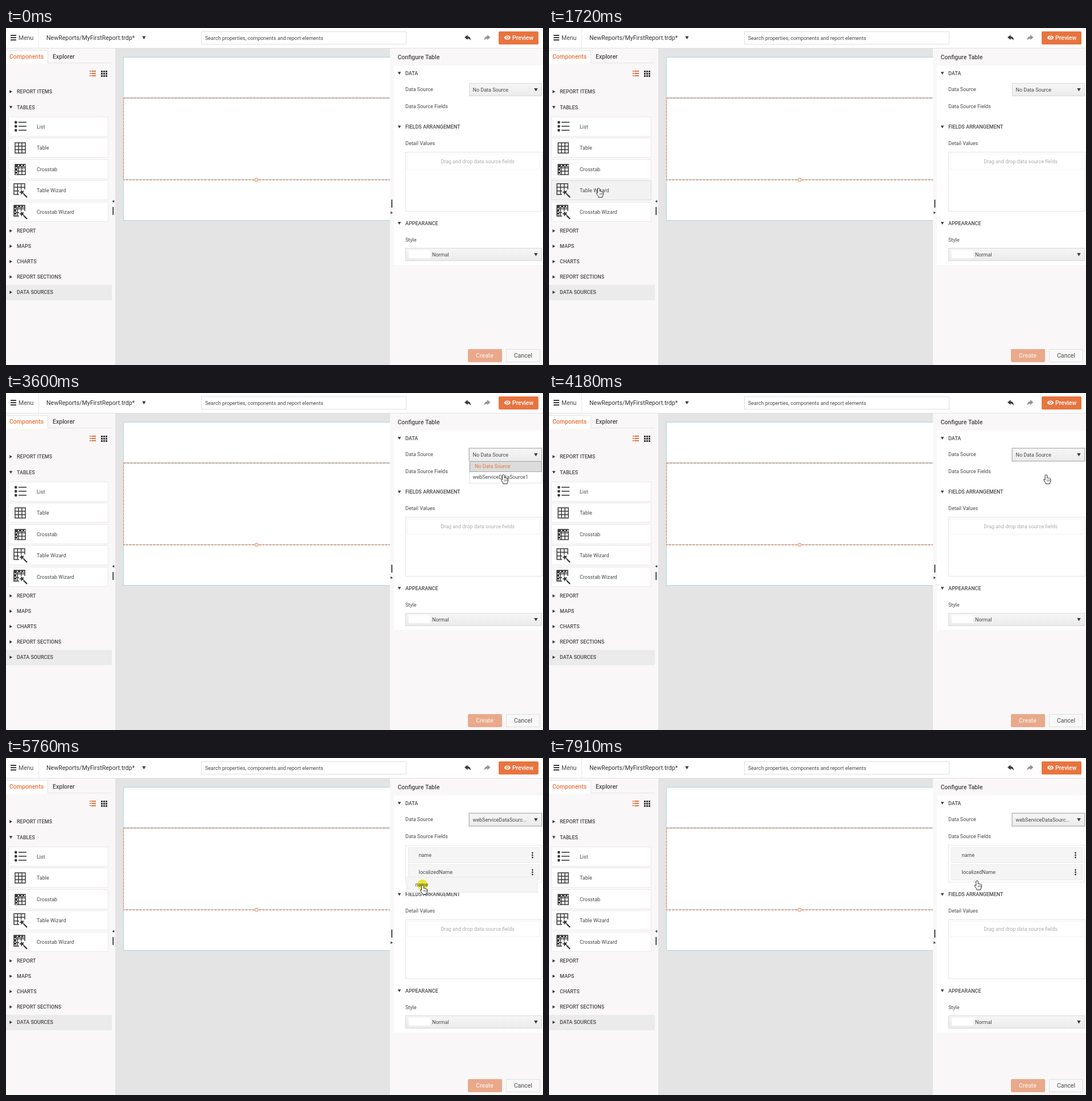
An HTML page with a canvas for the animation above (8 s loop, 944 px wide and 593 px high).

```html
<!DOCTYPE html>
<html lang="en">
<head>
<meta charset="utf-8">
<title>Report designer</title>
<style>
  html, body { margin: 0; width: 100%; height: 100%; overflow: hidden; }
  canvas { display: block; }
</style>
</head>
<body>
<canvas width="944" height="593"></canvas>
<script>
const c = document.querySelector('canvas').getContext('2d');
const LOOP = 8000, STEP = 72, FIRST = 132;
const ORANGE = '#e8743f', DARK = '#3a3a3a', TEXT = '#484848', BLUE = '#a9d8e2';

// Pointer path: [step, x, y]
const PATH = [
  [0, 760, 535], [3, 520, 272], [5, 457, 203], [12, 457, 203],
  [15, 340, 215], [18, 140, 268], [20, 87, 281], [24, 87, 281],
  [27, 205, 262], [31, 503, 204], [35, 748, 92], [36, 876, 104],
  [44, 876, 104], [48, 874, 143], [63, 873, 143], [68, 744, 169],
  [70, 732, 169], [74, 732, 169], [84, 732, 304], [102, 732, 304],
  [106, 748, 228], [108, 752, 215]
];
const CLICKS = [[8, 10], [40, 42], [53, 56], [73, 91]];
const HAND = new Path2D('M-1.8 1.3Q0-1 1.8 1.3V6Q3.4 5 4.4 6.4Q6 5.6 6.6 7.2Q8 6.8 8 8.6V11.5Q7.6 13.6 6.4 14.6V16.4H-.6V15Q-2.6 12.8-4 10Q-4.6 7.8-3 8.2L-1.8 9.4Z');
const ARROW = new Path2D('M0 0V12.2L2.8 9.6L4.7 13.9L6.7 13L4.8 8.8H8.7Z');
const REPLY = new Path2D('M-5.5-.5L0-5V-2.3Q5.5-2 5.5 5Q3.6 1.4 0 1.4V4Z');

const during = (n, [from, to]) => n >= from && n < to;

function pointerAt(n) {
  const i = PATH.findIndex(p => p[0] >= n);
  if (i < 1) return (i ? PATH[PATH.length - 1] : PATH[0]).slice(1);
  const [n0, x0, y0] = PATH[i - 1], [n1, x1, y1] = PATH[i];
  const k = (n - n0) / (n1 - n0);
  return [x0 + (x1 - x0) * k, y0 + (y1 - y0) * k];
}

function text(s, x, y, { size = 9, weight = 400, color = TEXT, align = 'left' } = {}) {
  c.font = `${weight} ${size}px Roboto, sans-serif`;
  c.fillStyle = color;
  c.textAlign = align;
  c.fillText(s, x, y + size * 0.356);
}

function rect(x, y, w, h, fill, stroke) {
  if (fill) { c.fillStyle = fill; c.fillRect(x, y, w, h); }
  if (stroke) { c.strokeStyle = stroke; c.lineWidth = 1; c.strokeRect(x + .5, y + .5, w - 1, h - 1); }
}

function dashed(x, y, w, h, color, dash) {
  c.setLineDash(dash);
  rect(x, y, w, h, null, color);
  c.setLineDash([]);
}

function triangle(x, y, angle, size = 3, color = DARK) {
  c.save();
  c.translate(x, y);
  c.rotate(angle);
  c.fillStyle = color;
  c.beginPath();
  c.moveTo(-size * .8, -size); c.lineTo(size * .9, 0); c.lineTo(-size * .8, size);
  c.fill();
  c.restore();
}
const DOWN = Math.PI / 2;

function dot(x, y, r, color, stroke) {
  c.beginPath();
  c.arc(x, y, r, 0, 7);
  c.fillStyle = color;
  c.fill();
  if (stroke) { c.strokeStyle = stroke; c.stroke(); }
}

function shape(path, x, y, fill, stroke, flip = 1) {
  c.save();
  c.translate(x, y);
  c.scale(flip, 1);
  c.fillStyle = fill;
  c.fill(path);
  if (stroke) { c.lineWidth = 1; c.lineJoin = 'round'; c.strokeStyle = stroke; c.stroke(path); }
  c.restore();
}

function grid(x, y, size, header) {
  c.strokeStyle = DARK;
  c.lineWidth = 1.5;
  c.strokeRect(x, y, size, size);
  c.beginPath();
  for (const k of [1, 2]) {
    const d = size * k / 3;
    c.moveTo(x + d, y); c.lineTo(x + d, y + size);
    c.moveTo(x, y + d); c.lineTo(x + size, y + d);
  }
  c.stroke();
  if (header) {
    rect(x, y, size, 4, DARK);
    rect(x, y, 4, size, DARK);
    for (const k of [5, 11, 16]) { rect(x + k, y + 1, 2, 2, '#fff'); rect(x + 1, y + k, 2, 2, '#fff'); }
  }
}

function wand(x, y, bg) {
  rect(x - 5, y - 5, 13, 13, bg);
  c.beginPath();
  for (let i = 0; i < 10; i++) {
    const r = i % 2 ? 2.2 : 5, a = i * Math.PI / 5 - 1.9;
    c.lineTo(x + r * Math.cos(a), y + r * Math.sin(a));
  }
  c.fillStyle = DARK;
  c.fill();
  c.lineWidth = 2.4;
  c.beginPath();
  c.moveTo(x + 3, y + 3); c.lineTo(x + 9, y + 9);
  c.stroke();
}

function toolbar() {
  rect(0, 0, 944, 36, '#fff');
  rect(0, 35, 944, 1, '#e2e0e0');
  rect(57, 0, 1, 35, '#e6e6e6');
  for (const y of [12, 16, 20]) rect(8, y, 10, 2, DARK);
  text('Menu', 22, 17, { size: 10.5 });
  text('NewReports/MyFirstReport.trdp*', 71, 17, { size: 10.6, color: '#333' });
  triangle(242.5, 17, DOWN, 3.2);
  rect(343, 6, 361, 23, '#fff', '#dfdfdf');
  text('Search properties, components and report elements', 350, 18);
  shape(REPLY, 811.5, 17, DARK);
  shape(REPLY, 846, 17, '#929292', null, -1);
  c.fillStyle = ORANGE;
  c.beginPath(); c.roundRect(866, 6, 70, 23, 2); c.fill();
  c.fillStyle = '#fff';
  c.beginPath(); c.ellipse(881.5, 17, 5.5, 3.6, 0, 0, 7); c.fill();
  dot(881.5, 17, 2.4, ORANGE);
  dot(881.5, 17, 1.2, '#fff');
  text('Preview', 890, 17, { size: 10.5, weight: 500, color: '#fff' });
}

function heading(s, y, open) {
  triangle(8.5, y, open ? DOWN : 0, 2.8);
  text(s, 19, y, { weight: 500 });
}

function sidebar(n, hovered) {
  rect(0, 36, 192, 557, '#f9f7f8');
  rect(0, 39, 74, 24, '#fff');
  rect(0, 39, 74, 1, '#e6e4e4');
  rect(73, 39, 1, 23, '#e6e4e4');
  rect(74, 61, 112, 1, '#e6e4e4');
  text('Components', 6, 50, { size: 10.5, weight: 500, color: ORANGE });
  text('Explorer', 82, 50, { size: 10.5, weight: 500 });
  for (let i = 0; i < 3; i++) {
    rect(147, 75 + i * 4, 2, 2, ORANGE);
    rect(150, 75 + i * 4, 8, 2, ORANGE);
    for (let j = 0; j < 3; j++) rect(167 + j * 4, 75 + i * 4, 3, 3, DARK);
  }
  heading('REPORT ITEMS', 112);
  heading('TABLES', 139.5, true);
  ['List', 'Table', 'Crosstab', 'Table Wizard', 'Crosstab Wizard'].forEach((name, i) => {
    const y = Math.round(155.5 + i * 37.5), mid = y + 17;
    const hot = hovered && i === 3, focused = i === 3 && during(n, [25, 36]);
    const bg = hot ? '#f2f2f2' : '#fff';
    if (focused) rect(4, y + 1, 176, 35, '#d2d2d2');
    rect(4, y, 176, 35, bg, hot || focused ? '#dadada' : '#ebe9e9');
    text(name, 54, mid + .5);
    if (i === 0) {
      for (const d of [-7, 0, 7]) {
        dot(17.3, mid + d, 2.4, DARK);
        rect(22, mid + d - 1, 14, 1.6, DARK);
      }
    } else {
      grid(i < 3 ? 16 : 14, mid - (i < 3 ? 8 : 11), i < 3 ? 18 : 19, i % 2 === 0);
      if (i > 2) wand(28, mid + 4, bg);
    }
  });
  rect(0, 452, 186, 27, '#ebebeb');
  ['REPORT', 'MAPS', 'CHARTS', 'REPORT SECTIONS', 'DATA SOURCES']
    .forEach((s, i) => heading(s, 357 + i * 27));
  triangle(188.5, 305, Math.PI, 2.2);
  rect(187.5, 315, 1.6, 14, '#222');
}

function report() {
  rect(192, 36, 484, 557, '#e4e4e4');
  rect(206, 51, 470, 288, '#fff', BLUE);
  rect(206, 122, 470, 2, BLUE);
  rect(206, 266, 470, 1, BLUE);
  dashed(206, 123, 470, 145, ORANGE, [4, 2]);
  c.lineWidth = 1;
  dot(440.5, 267, 2.8, '#fff', ORANGE);
}

function select(x, y, w, label, labelX, focused) {
  const g = c.createLinearGradient(0, y, 0, y + 23);
  g.addColorStop(0, '#f6f6f6');
  g.addColorStop(1, '#ebebeb');
  if (focused) rect(x - 1, y - 1, w + 2, 25, '#d6d6d6');
  rect(x, y, w, 23, g, focused ? '#bdbdbd' : '#d8d8d8');
  text(label, labelX, y + 11.5);
  triangle(931.5, y + 11.5, DOWN, 3.2);
}

function section(s, y) {
  triangle(691.5, y, DOWN, 2.8);
  text(s, 702, y, { weight: 500 });
}

function field(name, y) {
  rect(707, y, 231, 28, '#f5f5f5', '#ebebeb');
  text(name, 725.5, y + 14);
  for (const d of [-4, 0, 4]) dot(925.5, y + 14 + d, 1.4, DARK);
}

function panel(n) {
  const chosen = n >= 57, loaded = n >= 58;
  rect(675, 36, 269, 557, '#f9f7f7');
  text('Configure Table', 688.5, 51.5, { size: 10.5, weight: 500 });
  rect(682, 66, 262, loaded ? 417 : 351, '#fff');
  rect(677.5, 302, 1.6, 14, '#222');
  triangle(678, 325, 0, 2.2);
  section('DATA', 79.5);
  text('Data Source', 702, 108);
  text('Data Source Fields', 702, 138);
  select(814, 97, 128, chosen ? 'webServiceDataSourc...' : 'No Data Source', 820.5, n >= 40);
  if (loaded) {
    rect(702, 153, 240, 66, '#fff', '#e6e6e6');
    field('name', 157);
    field('localizedName', 187);
  }
  c.save();
  if (loaded) c.translate(0, 66);
  section('FIELDS ARRANGEMENT', 174);
  text('Detail Values', 702, 203);
  rect(702, 218, 241, 105, '#fff', '#e4e4e4');
  dashed(705, 221, 234, 28, '#e4e4e4', [1, 1]);
  text('Drag and drop data source fields', 829, 235, { color: '#acacac', align: 'center' });
  section('APPEARANCE', 343.5);
  text('Style', 702, 372.5);
  select(702, 387, 240, 'Normal', 749);
  rect(708, 391, 38, 14, '#fff');
  c.restore();
  c.fillStyle = '#e9a98b';
  c.beginPath(); c.roundRect(812, 565, 60, 23, 2); c.fill();
  text('Create', 841.5, 576, { size: 10.5, weight: 500, color: '#fbe9e0', align: 'center' });
  rect(879, 565, 60, 23, '#f8f8f8', '#dfdfdf');
  text('Cancel', 909, 576, { size: 10.5, align: 'center' });
}

function dropdown(n) {
  if (!during(n, [42, 56])) return;
  const open = Math.min(1, (n - 41) / 3);
  c.save();
  c.beginPath();
  c.rect(812, 119, 132, 42 * open);
  c.clip();
  c.translate(0, -40 * (1 - open));
  rect(814, 119, 129, 40, '#fff', '#e2e2e2');
  rect(815, 120, 127, 19, '#dcdcdc', '#a6a6a6');
  text('No Data Source', 824, 129, { color: ORANGE });
  text('webServiceDataSource1', 820.5, 148);
  c.restore();
}

function draw(time) {
  const n = Math.floor((time % LOOP - FIRST) / STEP);
  const [x, y] = pointerAt(n);
  const onRow = n >= 0 && x < 180 && y > 268 && y < 303;
  report();
  sidebar(n, onRow);
  panel(n);
  toolbar();
  dropdown(n);
  if (during(n, [75, 91])) {
    rect(x - 28, y - 14, 231, 28, '#f5f5f5', '#e9e9e9');
    text('name', x - 12.5, y);
  }
  if (CLICKS.some(span => during(n, span))) {
    c.globalCompositeOperation = 'multiply';
    dot(x, y, 9.3, '#f4f03a');
    c.globalCompositeOperation = 'source-over';
  }
  if (n >= 0) {
    const hand = onRow || n >= 63 || (x > 814 && y > 97 && y < 158);
    shape(hand ? HAND : ARROW, x + .5, y + .5, '#fff', '#26262e');
    if (hand) for (const d of [2, 4, 6]) rect(x + d, y + 9, .8, 3.5, '#55555c');
  }
}

function tick(now) {
  draw(now);
  requestAnimationFrame(tick);
}
tick(0);
document.fonts.ready.then(() => requestAnimationFrame(() => {}));
</script>
</body>
</html>
```
